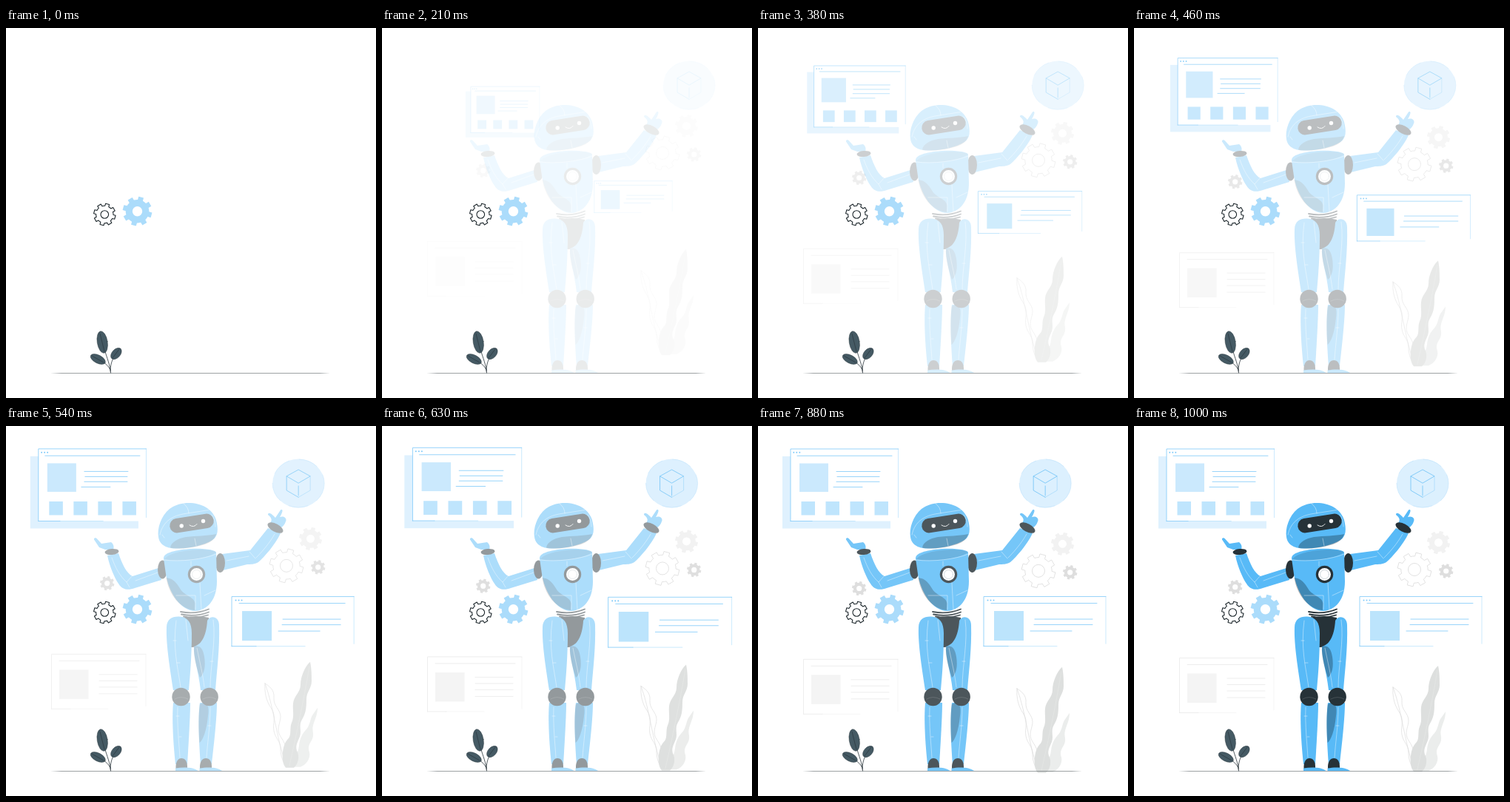
These frames come from a looping animation (500 px wide and 500 px high, 1.04 s). An HTML page:

```html
<!DOCTYPE html>
<html lang="en">
<head>
<meta charset="utf-8">
<title>Robot assistant</title>
<style>
html, body { margin: 0; width: 100%; height: 100%; overflow: hidden; background: #fff; }
svg { display: block; width: 100vw; height: 100vh; }
.line { fill: none; stroke-linecap: round; stroke-linejoin: round; }
.dark { fill: #263238; }
.shade { fill: #000; opacity: .27; }
.seam { stroke: #fff; stroke-width: .6; opacity: .7; }
.leaf { fill: #455a64; stroke: #263238; stroke-width: .4; }
</style>
</head>
<body>
<svg viewBox="0 0 500 500">
  <g id="windows"></g>
  <g id="page"></g>

  <g id="weeds">
    <path class="line" stroke="#dcdcdc" stroke-width=".7" d="M350 353C349 366 352 377 358 386C366 397 360 408 362 417C364 428 371 430 371 442C371 452 375 460 379 466M350 353C356 357 363 362 362 372C361 384 371 388 371 398C371 406 366 412 369 421C372 428 378 432 378 444M350 353C362 385 365 425 378 462"/>
    <path fill="#ebedec" d="M421 386C421 396 417 402 415 410C413 417 417 421 414 428C411 434 407 438 410 446C412 454 406 463 398 466H386C389 455 395 447 396 437C397 427 401 420 406 415C411 409 411 401 414 396Z"/>
    <path fill="#dddfde" d="M411 324C413 333 413 343 413 350C413 360 406 364 406 375C406 387 405 394 400 402C395 410 400 417 397 425C394 433 390 438 394 446C397 454 394 463 389 467H378C374 462 373 455 374 446C375 438 377 432 382 427C386 422 383 413 386 406C390 398 387 389 388 380C389 370 398 365 398 355C398 344 404 330 411 324Z"/>
    <path class="line" stroke="#e8eae9" stroke-width=".5" d="M410 330C403 372 393 420 383 464"/>
  </g>

  <path d="M60 466.5L75 466.2H424L438 466.5L424 466.8H75Z" fill="#3c464b"/>

  <g id="gears"></g>

  <g id="badge">
    <ellipse cx="390" cy="77.5" rx="35" ry="33" fill="#dcf0fe"/>
    <ellipse class="line" cx="390" cy="77.5" rx="35" ry="32.5" stroke="#bfe3fb" stroke-width=".6" stroke-dasharray="26 14"/>
    <g class="line" stroke="#6cc2f7" stroke-width=".8">
      <path d="M374 67.8L390 59L406 67.8L390 77.2L374 67.8V87L390 96.3M390 81V94"/>
      <path d="M406 67.8V87L390 96.3" opacity=".45"/>
    </g>
  </g>

  <g id="robot" fill="#58baf7">
    <!-- arms -->
    <path d="M209 191L171 203C163 199 157 187 152 172L137 175C140 190 147 206 152 213C157 222 166 222 174 219L210 208Z"/>
    <path d="M134 167L126 164L119 153.500C118.500 150.500 122 150.500 123.500 153L129 159L142 157C146 160 146 164 145 167Z"/>
    <ellipse class="dark" cx="143" cy="170" rx="9.500" ry="4" transform="rotate(-5 143 170)"/>
    <path d="M292 173L330 168L354 138L371 145C364 160 350 176 341 184C336 187 330 187 326 187L293 195Z"/>
    <path d="M357 131C360 127 359 124 354 120C354 116 358 117 364 124L371 113.500C375 111.500 374 117 370 123C376 121 380 125 378 129C377 133 374 136 371 138Z"/>
    <ellipse class="dark" cx="364" cy="137.500" rx="11.500" ry="5.500" transform="rotate(28 364 137.500)"/>
    <ellipse class="dark" cx="211.500" cy="194" rx="6.500" ry="12.500"/>
    <ellipse class="dark" cx="289.500" cy="185" rx="6.500" ry="13"/>
    <!-- legs -->
    <path class="dark" d="M240 259Q258 255 274 259C276 280 266 300 250 299Z"/>
    <path d="M217 272C217 261 225 257 234 257.500C246 258 251 266 251 280C251 310 249 335 247 357H226C222 330 216 295 217 272Z"/>
    <path d="M272 263C276 255 288 257 288 269C289 300 285 330 283 357H263C260 330 253 312 254 298C266 295 271 280 272 263Z"/>
    <path class="shade" d="M254 298C262 296 266 300 268 312C270 325 268 335 262 340C257 325 253 310 254 298Z"/>
    <path d="M226 374H249C249 390 247 425 245 457H229C226 430 224 395 226 374Z"/>
    <path d="M262 374H285C285 395 281 430 278 457H263C261 430 259 395 262 374Z"/>
    <path class="shade" d="M262 376C268 372 276 374 273 392C271 412 266 425 261.500 428C260 410 260 390 262 376Z"/>
    <g class="dark">
      <circle cx="236.500" cy="366" r="12.200"/>
      <circle cx="274.700" cy="366" r="12.200"/>
      <path d="M229.500 463C229 453 233 449 237 449C242 449 245.500 453 245 463Z"/>
      <path d="M262 463C261.500 453 265.500 449 270 449C275 449 278.500 453 278 463Z"/>
    </g>
    <path d="M229 466V462.500C240 460.500 254 461 259.500 466Z"/>
    <path d="M261.500 466V462.500C272 460.500 286 461 292 466Z"/>
    <!-- torso -->
    <path class="line" stroke="#263238" stroke-width="1.800" d="M236 251Q256 255 274 247.500M237 254.500Q256 258.500 274 251.500M240 257.500Q256 261 273 255.500"/>
    <path d="M213 179C213 172 225 168 248 166C270 165 284 168 284 171L285 210C285 235 272 249 256 250C236 250 220 225 216 200Z"/>
    <path class="shade" d="M216.500 205C227 206 231 213 236 221C241 229 255 231 255.500 240L255 249C235 247 220 228 216.500 205Z"/>
    <path class="shade" d="M214 180C219 172 240 168 260 167C274 167 282 168 284 171C270 180 235 184 214 180Z" style="opacity:.12"/>
    <circle class="dark" cx="257.500" cy="200.500" r="11.700"/>
    <circle cx="257.500" cy="200.500" r="8.500" fill="#fff"/>
    <circle class="line" cx="257.500" cy="200.500" r="6" stroke="#b8c4ca" stroke-width=".7"/>
    <!-- head -->
    <path d="M206 150C204 139 209 122 221 112C230 105.500 240 103.500 250 104C267 105 280 114 284 127C287 139 287 149 279 154C268 161 250 165 234 165.500C220 166 208 163 206 150Z"/>
    <path class="shade" d="M222 164.500C223 157 232 152 243 150C258 148 270 149 284 146C281 157 270 161 250 164.300C238 166 228 166 222 164.500Z"/>
    <rect class="dark" x="221" y="121.700" width="60" height="19.500" rx="9.700" transform="rotate(-9 251 131.500)"/>
    <g fill="#fff">
      <circle cx="237.200" cy="135" r="2.700"/>
      <circle cx="266.500" cy="128.500" r="2.700"/>
    </g>
    <path class="line" stroke="#fff" stroke-width=".9" d="M248 134Q254 138 258 132.500"/>
    <path class="line seam" d="M208 147C212 128 226 121 242 118.500L274 113.500M240 105Q247 110 247 118M211 147L214 151M278 120Q283 126 283 136M255 152L257 162
      M214 181C235 184 268 180 284 173M230 229H256V248M250 183V189M262 212L264 248M268 229L283 222
      M143 178C148 192 154 203 163 211L170 203M163 211L167 218M175 209L205 198M298 182L328 176M337 179L329 170M338 178C350 166 358 155 363 146
      M230 263C225 300 232 325 236 353M243 262L246 290M226 290H230M231 320H235M280 262C284 290 276 325 276 353M258 300C262 320 266 335 268 353M276 318H280
      M232 380C231 405 234 430 235 448M230 392H234M234 420H237M276 380C276 405 272 430 271 448M273 405H277"/>
    <path class="line seam" d="M228 369Q236 364 246 369M266 369Q275 364 284 369" style="opacity:.25"/>
  </g>

  <g id="still"></g>

  <g class="line" stroke="#263238" stroke-width=".8">
    <path d="M141.500 466C141 456 136 445 133 434M141 462C138 456 134 453 130 451M141 464C141 455 143 450 146 444"/>
    <ellipse class="leaf" cx="130.200" cy="424.500" rx="7" ry="15" transform="rotate(-9 130.200 424.500)"/>
    <ellipse class="leaf" cx="124.300" cy="447.500" rx="11" ry="5.500" transform="rotate(27 124.300 447.500)"/>
    <ellipse class="leaf" cx="148.900" cy="440" rx="9" ry="5.700" transform="rotate(-48 148.900 440)"/>
    <path d="M127 413L133 437M116 443L132 452M153 434L144 446" stroke-width=".6"/>
  </g>
</svg>
<script>
const el = id => document.getElementById(id);

function gear(x, y, r, hole, paint) {
  const at = (deg, rad) => {
    const a = deg * Math.PI / 180;
    return (x + rad * Math.cos(a)).toFixed(2) + ' ' + (y + rad * Math.sin(a)).toFixed(2);
  };
  const root = r * .79;
  let d = '';
  for (let i = 0; i < 8; i++) {
    const a = i * 45 + 15;
    d += `${i ? 'L' : 'M'}${at(a - 13, root)}L${at(a - 10, r)}L${at(a + 10, r)}L${at(a + 13, root)}A${root} ${root} 0 0 1 ${at(a + 32, root)}`;
  }
  d += `ZM${x - hole} ${y}a${hole} ${hole} 0 1 0 ${2 * hole} 0a${hole} ${hole} 0 1 0 ${-2 * hole} 0Z`;
  return `<path d="${d}" fill-rule="evenodd" stroke-linejoin="round" ${paint}/>`;
}

const rect = (x, y, w, h, fill) => `<rect x="${x}" y="${y}" width="${w}" height="${h}" fill="${fill}"/>`;
const row = (x1, x2, y) => `M${x1} ${y}H${x2}`;
const dots = (x, y, color) => [0, 4, 8].map(dx => `<circle cx="${x + dx}" cy="${y}" r="1" fill="${color}"/>`).join('');

// Browser-like panel: the right and bottom edges are fainter.
function panel(x, y, w, h, color, rows) {
  return rect(x, y, w, h, '#fff') +
    `<g class="line" stroke="${color}" stroke-width=".8">
      <path d="M${x} ${y + h}V${y}H${x + w}M${x} ${y + h}h${w * .2}${rows.map(r => row(...r)).join('')}"/>
      <path d="M${x + w} ${y}V${y + h * .95}M${x + w * .2} ${y + h}h${w * .4}" opacity=".5"/>
    </g>`;
}

const blue = '#7fcaf9';
el('windows').innerHTML =
  rect(33, 41, 146, 97.5, '#dff1fe') +
  panel(44, 31, 145.5, 97.5, blue,
    [[53, 181, 40.3], [106, 165, 61.5], [107, 164, 68.5], [106, 164, 75.3], [102, 141, 82.5]]) +
  dots(48.3, 35.8, blue) +
  rect(56, 50.5, 39, 38.5, '#cbe9fd') +
  [58.5, 91.5, 124.5, 157.5].map(x => rect(x, 102, 18.5, 18.5, '#bfe5fd')).join('') +
  panel(305, 230.5, 165, 67, blue,
    [[315, 458, 239.5], [374, 452, 261], [373, 452, 268.5], [368, 424, 277]]) +
  dots(310.5, 235.5, blue) +
  rect(319, 250, 40, 40, '#bce4fc');

el('page').innerHTML =
  panel(61.5, 313.5, 127.5, 74, '#e9e9e9',
    [[72, 180, 322.5], [126, 177, 341], [126, 177, 349.5], [126, 177, 358], [126, 177, 367]]) +
  rect(72, 334.5, 39.5, 39.5, '#f4f4f4');

el('gears').innerHTML =
  gear(379, 194, 23, 8.5, 'fill="none" stroke="#dedede" stroke-width=".9"') +
  gear(411.5, 157.5, 15.7, 5.5, 'fill="#f2f2f2"') +
  gear(421.7, 196, 9.8, 3.6, 'fill="#dedede"') +
  gear(136.7, 217.7, 9.8, 3.6, 'fill="#dedede"');

el('still').innerHTML =
  gear(177.5, 247.7, 20, 6.7, 'fill="#abdcfb"') +
  gear(133.3, 252, 14.8, 5.3, 'fill="#fff" stroke="#1c262b" stroke-width="1.1"');

// cubic-bezier(.36, -.01, .5, 1.38)
function slideEase(p) {
  const curve = (t, a, b) => 3 * a * t * (1 - t) ** 2 + 3 * b * t * t * (1 - t) + t ** 3;
  let lo = 0, hi = 1;
  for (let i = 0; i < 30; i++) {
    const mid = (lo + hi) / 2;
    if (curve(mid, .36, .5) < p) lo = mid; else hi = mid;
  }
  return curve(lo, -.01, 1.38);
}

const zoomKeys = [[0, 0], [.13, .12], [.21, .27], [.38, .7], [.54, 1], [.71, 1.046], [.88, 1], [1, 1]];
function zoomEase(p) {
  const i = Math.max(1, zoomKeys.findIndex(k => k[0] >= p));
  const [[x0, y0], [x1, y1]] = [zoomKeys[i - 1], zoomKeys[i]];
  return y0 + (y1 - y0) * (p - x0) / (x1 - x0);
}

// 24 steps a second on a 10 ms clock, after a 130 ms hold.
const loop = 1040, hold = 130, step = 1000 / 24;
function progress(time) {
  const tick = Math.floor(time / 10) * 10;
  if (tick < hold) return 0;
  const n = Math.ceil((tick - hold + 10) / step - 1e-6) - 1;
  return Math.min(1, (hold + n * step) / 1000);
}

function pose(id, opacity, transform = '') {
  el(id).setAttribute('opacity', Math.min(1, Math.max(0, opacity)));
  el(id).setAttribute('transform', transform);
}

function draw(time) {
  const p = progress(time);
  const slide = slideEase(p), zoom = zoomEase(p);
  const shift = 30 * (1 - slide);
  for (const id of ['page', 'weeds', 'gears']) pose(id, slide, `translate(0 ${-shift})`);
  pose('badge', slide, `translate(${shift} 0)`);
  pose('windows', zoom, `translate(254.5 164.5) scale(${.5 + .5 * zoom}) translate(-254.5 -164.5)`);
  pose('robot', p ** 1.5);
}

const start = performance.now();
function frame() {
  draw((performance.now() - start) % loop);
  requestAnimationFrame(frame);
}
frame();
</script>
</body>
</html>
```
